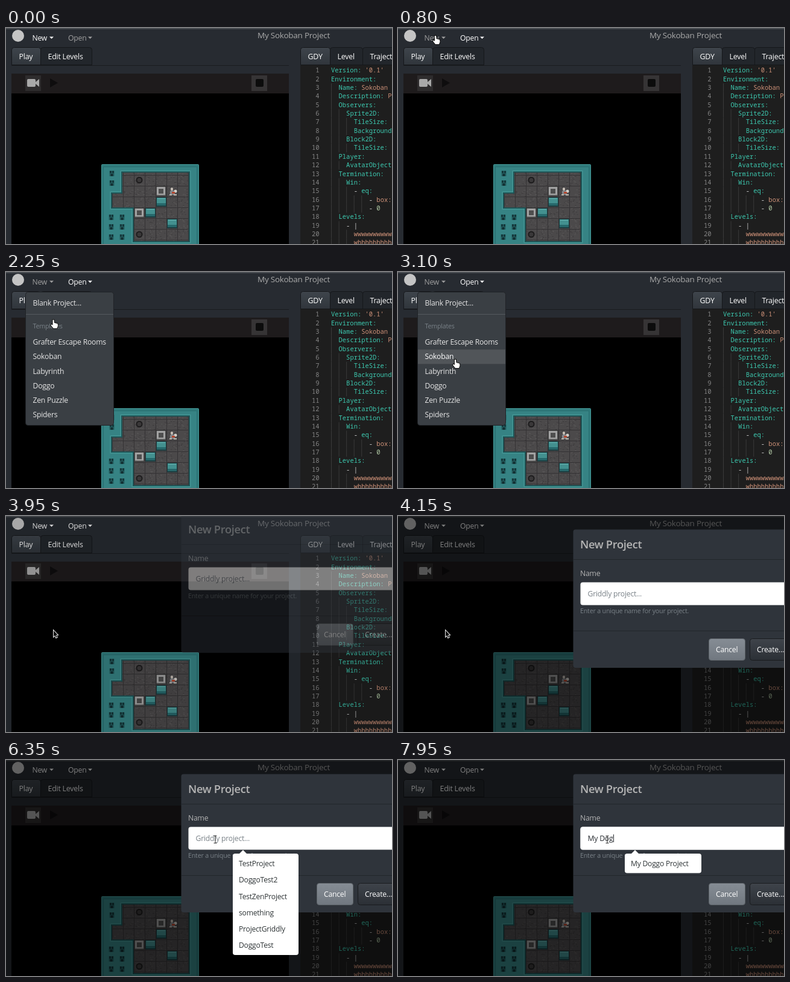
These frames come from a looping animation (640 by 360 pixels, 8000 ms). An HTML page with a canvas:

```html
<!DOCTYPE html>
<html lang="en">
<head>
<meta charset="utf-8">
<title>New project dialog</title>
<style>
html, body { margin: 0; width: 100%; height: 100%; overflow: hidden; background: #272b30; }
canvas { display: block; }
</style>
</head>
<body>
<canvas id="stage" width="640" height="360"></canvas>
<script>
const LOOP = 8000, MENU_OPEN = 1000, PICK = 3885, LIST_OPEN = 5900;
const SANS = '"Open Sans", "Noto Sans", sans-serif';
const MONO = '"Noto Sans Mono", "DejaVu Sans Mono", monospace';
const stage = document.getElementById('stage').getContext('2d');
let g = stage;

const clamp = v => Math.max(0, Math.min(1, v));

function rect(x, y, w, h, fill, r = 0, line) {
  g.beginPath();
  g.roundRect(x, y, w, h, r);
  g.fillStyle = fill;
  g.fill();
  if (line) { g.strokeStyle = line; g.lineWidth = 1; g.stroke(); }
}

function poly(points, fill, line, width = 1) {
  g.beginPath();
  points.forEach(([x, y]) => g.lineTo(x, y));
  g.closePath();
  if (line) { g.strokeStyle = line; g.lineWidth = width; g.stroke(); }
  if (fill) { g.fillStyle = fill; g.fill(); }
}

function circle(x, y, r, fill, line, width = 1) {
  g.beginPath();
  g.arc(x, y, r, 0, 7);
  if (fill) { g.fillStyle = fill; g.fill(); }
  if (line) { g.strokeStyle = line; g.lineWidth = width; g.stroke(); }
}

// y is the middle of the capitals
function text(s, x, y, color = '#fff', size = 12.2, weight = 500) {
  g.font = `${weight} ${size}px ${SANS}`;
  g.letterSpacing = -0.018 * size + 'px';
  g.fillStyle = color;
  g.fillText(s, x, y + size * 0.35);
  return g.measureText(s).width;
}

function shade(y, h, top, bottom) {
  const s = g.createLinearGradient(0, y, 0, y + h);
  s.addColorStop(0, top);
  s.addColorStop(1, bottom);
  return s;
}

function layer(draw) {
  const c = document.createElement('canvas');
  c.width = 640;
  c.height = 360;
  g = c.getContext('2d');
  draw();
  g = stage;
  return c;
}

function tab(label, x, w, active) {
  rect(x + .5, 32.5, w, 29, active ? shade(32, 30, '#3f454c', '#30353b') : '#22262b', [4, 4, 0, 0], '#15171a');
  text(label, x + 12.5, 47.5, '#fff', 12.4);
}

const CODE = `Version: '0.1'
Environment:
  Name: Sokoban
  Description: Push the boxes
  Observers:
    Sprite2D:
      TileSize: 24
      BackgroundTile: floor.png
    Block2D:
      TileSize: 24
  Player:
    AvatarObject: avatar
  Termination:
    Win:
      - eq:
          - box:count
          - 0
  Levels:
    - |
      wwwwwwwwwwwww
      whhhhhhhhhhhh`.split('\n');

function editor() {
  const cell = 6.28;
  rect(488, 62, 152, 298, '#1e1e1e');
  g.font = `10.46px ${MONO}`;
  g.letterSpacing = '0px';
  CODE.forEach((line, i) => {
    const y = 70.5 + i * 14.36, indent = line.search(/\S/);
    for (let c = 0; c < indent; c += 2) rect(539 + c * cell, y - 7, 1, 14.4, '#3a3a3a');
    g.fillStyle = '#858585';
    g.textAlign = 'right';
    g.fillText(i + 1, 519.5, y + 3.7);
    g.textAlign = 'left';
    const [, lead, key, value] = line.match(/^(\s*(?:- )?)(\w+:(?= |$))?(.*)$/);
    const put = (s, col, color) => {
      g.fillStyle = color;
      g.fillText(s, 539 + col * cell, y + 3.7);
    };
    put(lead, 0, '#d4d4d4');
    if (key) put(key, lead.length, '#3dc9b0');
    const plain = value === '|' ? '#d4d4d4' : /^ ?\d+$/.test(value) ? '#b5cea8' : '#ce9178';
    put(value, lead.length + (key || '').length, plain);
  });
}

const tileX = c => 158 + 18 * c, tileY = r => 227 + 18 * r;

function block(c, r) {
  const x = tileX(c), y = tileY(r);
  rect(x + 1, y + 1, 17, 16, '#1d3b3e');
  rect(x + 2, y + 2, 15, 9, '#43908f');
  rect(x + 2, y + 11, 15, 4, '#26686b');
  rect(x + 3, y + 3, 13, 1, '#62aeac');
}

function crate(c, r) {
  const x = tileX(c), y = tileY(r);
  rect(x + 1, y + 1, 16, 16, '#6e6e6e', 1, '#303030');
  rect(x + 2, y + 2, 14, 13, '#a2a2a2');
  rect(x + 5, y + 5, 8, 8, '#4e4e4e');
}

function level() {
  rect(158.5, 227.5, 161, 140, '#2f7b7c', 1, '#479b9a');
  rect(161.5, 231.5, 155, 140, '#368384', 0, '#2a6f71');
  const floor = [[193, 241], [303, 241], [303, 355], [212, 355], [212, 299], [176, 299], [176, 276], [193, 276]];
  poly(floor, null, '#439796', 7);
  poly(floor, '#4b494a', '#1d5355', 4);
  g.save();
  g.clip();
  for (let i = 0; i < 700; i++) {
    const n = Math.sin(i * 12.9898) * 43758.5453, m = Math.sin(i * 78.233) * 12345.678;
    const x = 176 + (n - Math.floor(n)) * 127, y = 241 + (m - Math.floor(m)) * 114;
    rect(x, y, 2, 1, i % 2 ? '#5a5858' : '#3d3b3c');
  }
  for (let i = 1; i < 9; i++) {
    rect(tileX(i), 241, 1, 114, '#343234');
    rect(176, tileY(i), 127, 1, '#343234');
  }
  g.restore();
  const notch = (x, y) => {
    rect(x - 4, y - 4, 8, 9, '#245e60');
    rect(x - 3, y - 4, 2, 4, '#0f2b2e');
    rect(x + 1, y - 4, 2, 4, '#0f2b2e');
    rect(x - 2, y + 1, 4, 4, '#122f32');
  };
  for (const y of [242, 258]) notch(175.5, y);
  for (const y of [315, 331, 348]) { notch(174.5, y); notch(192.5, y); }
  for (const y of [253.5, 344]) circle(221, y, 4.5, '#3a3839', '#1d1c1d', 2);
  crate(5, 2);
  crate(3, 4);
  block(5, 3);
  block(4, 4);
  block(6, 5);
  rect(273, 266, 4, 5, '#c8c0b8', 2);
  rect(272, 271, 8, 7, '#85898e', 2);
  circle(281, 272, 2.5, '#d2cec8');
  rect(275, 273, 5, 3, '#b5472f');
  rect(271, 277, 4, 2, '#b9b4ad');
  rect(278, 277, 5, 2, '#b9b4ad');
}

const page = layer(() => {
  rect(0, 0, 640, 360, '#272b31');
  rect(0, 0, 640, 2, '#484c51');
  circle(20, 13, 10, '#c4c4c4');
  text('My Sokoban Project', 417, 12, '#aaa', 13.5);
  rect(9, 62, 460, 1, '#1a1c1f');
  tab('Play', 9, 48, true);
  tab('Edit Levels', 57, 85);
  tab('GDY', 488, 49, true);
  tab('Level', 537, 54);
  tab('Trajectories', 591, 95);
  rect(9, 76, 460, 33, '#1e1b1c');
  rect(9, 109, 460, 251, '#000');
  rect(32, 79, 26, 26, '#2e2c2d');
  rect(35, 85, 14, 13, '#a9a9a9', 2);
  poly([[49, 90], [55, 85], [55, 98], [49, 93]], '#a9a9a9');
  poly([[73, 84], [86, 91.5], [73, 99]], '#0e0d0e');
  rect(407, 79, 26, 26, '#363435');
  rect(414, 85, 13, 13, '#0c0c0c', 2);
  level();
  editor();
});

const field = () => rect(302.5, 111.5, 400, 38, '#fff', 4);

const modal = layer(() => {
  rect(290.5, 23.5, 400, 230.5, '#2f343b', 4);
  rect(291, 73, 349, 1, '#22262b');
  rect(291, 192, 349, 1, '#22262b');
  text('New Project', 302, 48.5, '#b4b4b4', 18.3, 600);
  text('Name', 302, 97, '#b4b4b4');
  field();
  text('Griddly project...', 314.5, 130.5, '#7a8288');
  text('Enter a unique name for your project.', 302, 159, '#7a8288', 10.7, 400);
  rect(515.5, 205.5, 60, 36, shade(205, 37, '#868d95', '#70777f'), 4, '#5d6368');
  text('Cancel', 527, 223.5);
  rect(583.5, 205.5, 80, 36, shade(205, 37, '#3f444b', '#2b2f35'), 4, '#191b1e');
  text('Create...', 595, 223.5);
});

const ITEMS = ['Grafter Escape Rooms', 'Sokoban', 'Labyrinth', 'Doggo', 'Zen Puzzle', 'Spiders'];

function menu(hot) {
  rect(32.5, 33.5, 146, 222, '#3a3f44', 4, '#202327');
  text('Blank Project...', 44.5, 52, '#e6e6e6');
  rect(33, 70, 145, 1, '#54595e');
  text('Templates', 44.5, 90.5, '#7a8288', 10.65);
  ITEMS.forEach((s, i) => {
    const y = 117 + i * 24.15;
    const on = Math.abs(hot - y) < 12;
    if (on) rect(33, y - 12, 145, 24, '#515559');
    text(s, 44.5, y, on ? '#fff' : '#e6e6e6');
  });
}

const SAVED = ['TestProject', 'DoggoTest2', 'TestZenProject', 'something', 'ProjectGriddly', 'DoggoTest'];

function popup(list, w, h) {
  rect(376, 156, w, h, '#fff', 4);
  poly([[386, 157], [393, 150], [400, 157]], '#fff');
  list.forEach((s, i) => text(s, 386, 173 + i * 27.2, '#2e3436', 12.1));
}

// time, x, y of the pointer tip
const PATH = [[150, 124, -20], [350, 122, 14], [800, 62, 13], [1800, 62, 13], [2700, 95, 146],
  [3200, 95, 146], [3600, 78, 190], [4300, 78, 190], [5150, 347, 132], [8001, 347, 132]];

function pointerAt(t) {
  const i = Math.max(1, PATH.findIndex(p => p[0] > t));
  const [t0, x0, y0] = PATH[i - 1], [t1, x1, y1] = PATH[i];
  const u = clamp((t - t0) / (t1 - t0)), e = u * u * (3 - 2 * u);
  return [x0 + (x1 - x0) * e, y0 + (y1 - y0) * e];
}

function pointer(x, y, kind) {
  g.save();
  g.translate(x, y);
  if (kind === 'beam') {
    rect(-.5, -5, 1, 11, '#333');
    rect(-2.5, -6, 5, 1, '#333');
    rect(-2.5, 6, 5, 1, '#333');
  } else if (kind === 'hand') {
    poly([[-1, 0], [1, 0], [1.5, 5], [7, 6.5], [7.5, 10], [6, 14], [0, 14], [-4, 9], [-3, 7.5], [-1, 9]], '#fff', '#111', 2);
  } else {
    poly([[1, 1], [1, 11], [3.2, 9], [5, 12.8], [6.6, 12], [4.9, 8.4], [7.6, 8]], '#111', '#e8e8e8', 2);
  }
  g.restore();
}

const TYPED = 'My Dog', KEYS = [6550, 6800, 7050, 7350, 7650, 7900];

function dialog(t) {
  const u = clamp((t - PICK) / 300), shown = clamp((t - PICK) / 150);
  g.fillStyle = `rgba(0,0,0,${shown ** 1.5 * .5})`;
  g.fillRect(0, 0, 640, 360);
  g.globalAlpha = shown;
  g.drawImage(modal, 0, Math.round(-40 * (1 - u) ** 1.7));
  g.globalAlpha = 1;
  const typed = KEYS.filter(k => t >= k);
  if (typed.length) {
    field();
    const w = text(TYPED.slice(0, typed.length), 314.5, 130.5, '#272b30');
    if ((t - typed.at(-1)) % 1000 < 500) rect(Math.round(315 + w), 124, 1, 13, '#272b30');
    popup(['My Doggo Project'], 127, 32.5);
  } else if (t >= LIST_OPEN) {
    g.globalAlpha = clamp((t - LIST_OPEN) / 150);
    popup(SAVED, 109, 169);
    g.globalAlpha = 1;
  }
}

function nav(label, x, caret, dim) {
  const color = dim ? '#a0a0a0' : '#fff';
  text(label, x, 16.5, color);
  poly([[caret, 14.5], [caret + 7, 14.5], [caret + 3.5, 18]], color);
}

function draw(t) {
  const [x, y] = pointerAt(t), open = t >= MENU_OPEN && t < PICK;
  g.drawImage(page, 0, 0);
  nav('New', 43.5, 72, t >= 650 && t < PICK);
  nav('Open', 103, 136, t < 550);
  if (open) menu(y);
  if (t >= PICK) dialog(t);
  const kind = t < PICK ? 'hand' : x > 302 && y < 149 ? 'beam' : 'arrow';
  pointer(x, y, kind);
}

function tick() {
  draw(performance.now() % LOOP);
  requestAnimationFrame(tick);
}
tick();
</script>
</body>
</html>
```
